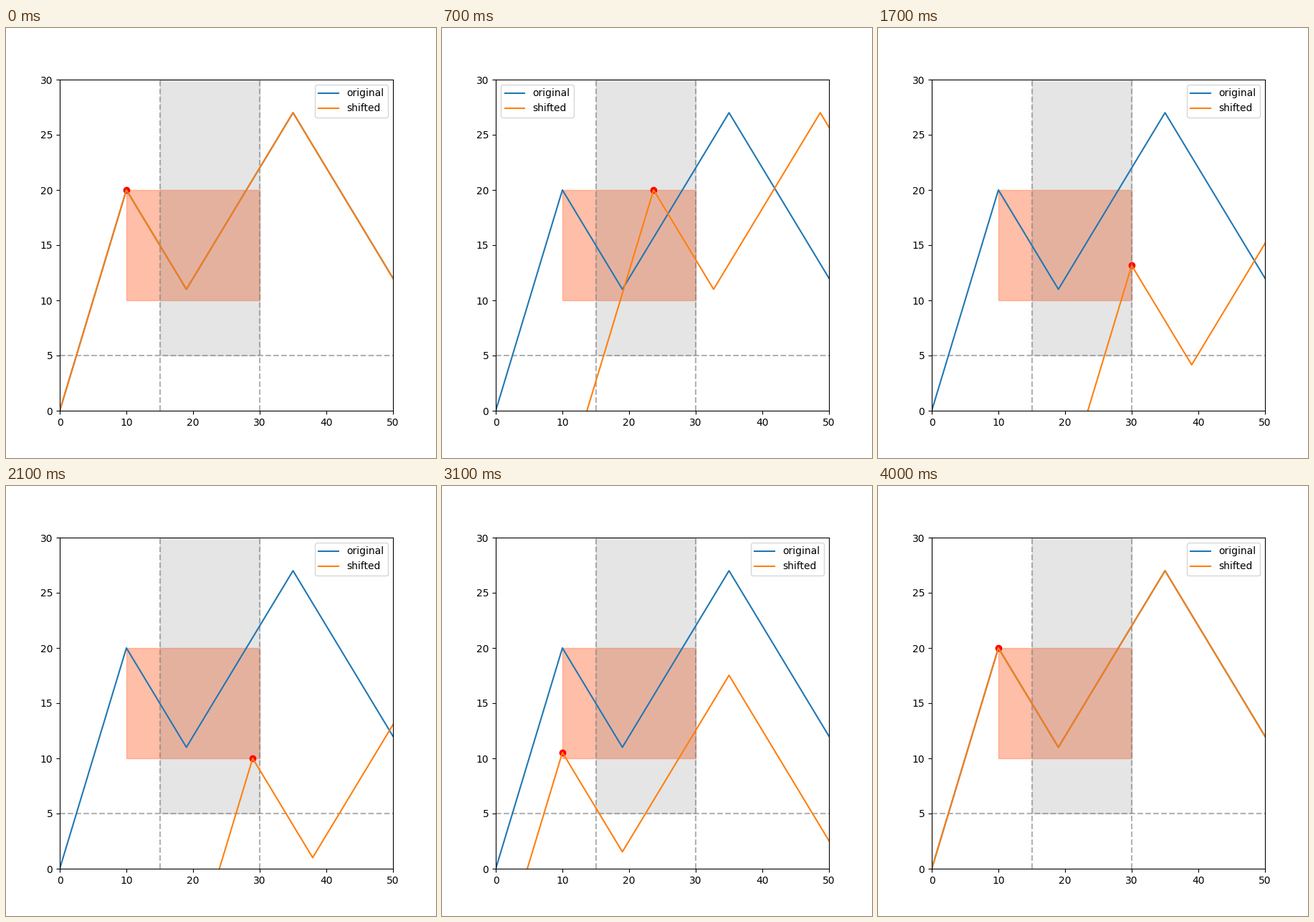
A matplotlib script for the animation above (4.05 s loop, 600 by 600 pixels).

```python
import matplotlib.pyplot as plt
import numpy as np
from matplotlib.animation import FuncAnimation
from matplotlib.patches import Rectangle

STEPS = 20  # positions along each side of the box
HOLD = 1    # extra ticks on the starting pose

curve = np.array([(0, 0), (10, 20), (19, 11), (35, 27), (50, 12)], float)
anchor = curve[1]

# Clockwise round the box; each corner closes one side and opens the next.
corners = np.array([(10, 20), (30, 20), (30, 10), (10, 10), (10, 20)], float)
path = np.concatenate([np.linspace(a, b, STEPS)
                       for a, b in zip(corners[:-1], corners[1:])])

fig, ax = plt.subplots(figsize=(6, 6), dpi=100)
ax.set_xlim(0, 50)
ax.set_ylim(0, 30)

ax.add_patch(Rectangle((10, 10), 20, 10, color="coral", alpha=0.5))
ax.add_patch(Rectangle((15, 5), 15, 25, color="gray", alpha=0.2))

guide = dict(color="gray", linestyle="--", alpha=0.6)
ax.axvline(15, **guide)
ax.axvline(30, **guide)
ax.axhline(5, **guide)

ax.plot(*curve.T, label="original")
shifted, = ax.plot(*curve.T, label="shifted")
dot = ax.scatter(*anchor, color="red")
ax.legend(loc="best")


def update(i):
    pos = path[max(0, i - HOLD)]
    shifted.set_data(*(curve + pos - anchor).T)
    dot.set_offsets([pos])
    return shifted, dot


anim = FuncAnimation(fig, update, frames=len(path) + HOLD, interval=50,
                     repeat=True, repeat_delay=0)
plt.show()
```
